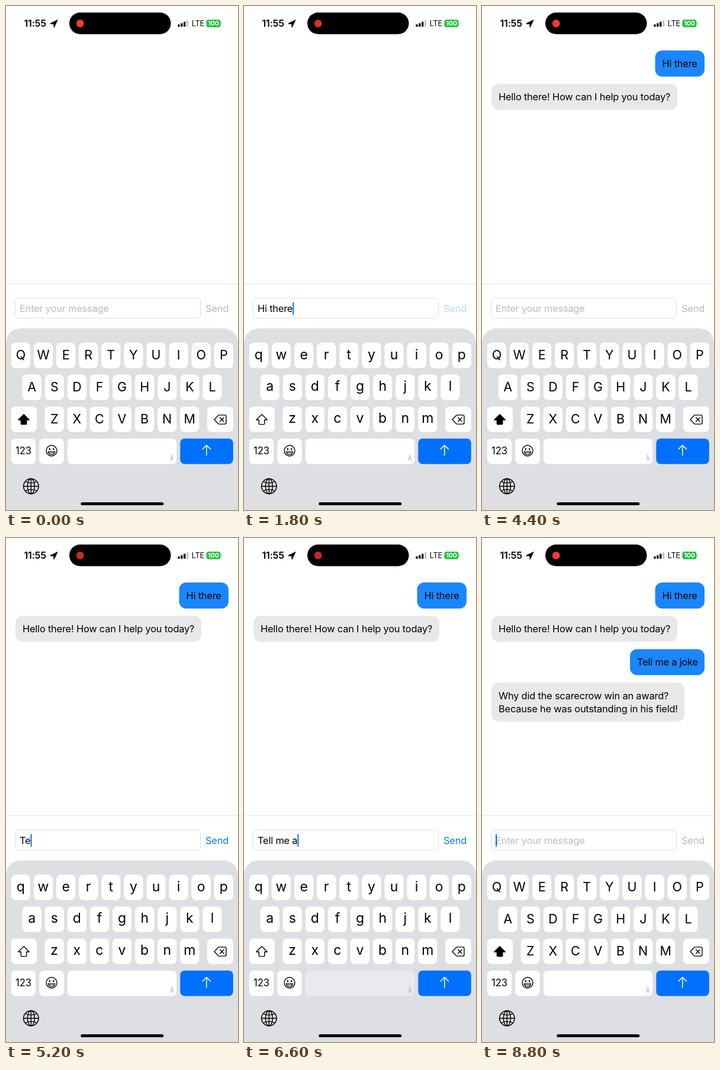
Write an HTML page that moves like this. It is 392 px wide and 850 px high and loops after 8900 ms.

```html
<!DOCTYPE html>
<html lang="en">
<head>
<meta charset="utf-8">
<title>Chat</title>
<style>
  html, body { margin: 0; width: 100%; height: 100%; overflow: hidden; background: #fff; }
  svg { display: block; width: 392px; height: 850px; }
  text { font: 400 16.4px Inter, Roboto, sans-serif; letter-spacing: -.2px; white-space: pre; }
  .key { letter-spacing: 0; text-anchor: middle; }
</style>
</head>
<body>
<svg id="stage" viewBox="0 0 392 850"></svg>
<script>
const LOOP = 8900;
const stage = document.getElementById('stage');

function add(tag, attrs, parent = stage) {
  const el = document.createElementNS('http://www.w3.org/2000/svg', tag);
  for (const name in attrs) el.setAttribute(name, attrs[name]);
  return parent.appendChild(el);
}
const box = (x, y, width, height, rx, fill, parent) =>
  add('rect', { x, y, width, height, rx, fill }, parent);
const line = (d, stroke, width, parent) =>
  add('path', { d, stroke, 'stroke-width': width, fill: 'none',
    'stroke-linecap': 'round', 'stroke-linejoin': 'round' }, parent);
function label(string, x, y, style = '', parent) {
  const el = add('text', { x, y, style }, parent);
  el.textContent = string;
  return el;
}
function show(el, visible) {
  el.style.visibility = visible ? 'visible' : 'hidden';
}

// Status bar
label('11:55', 30.5, 35, 'font-size:16px;font-weight:600');
add('path', { d: 'M87.3 23.3L75 29.3Q74.3 30 75.2 30.2L80.6 30.3L80.8 35.7Q81 36.6 81.6 35.7Z', stroke: '#000', 'stroke-width': .6 });
box(107, 11, 171.5, 36.5, 18.25, '#000');
const recordDot = add('circle', { cx: 125.2, cy: 29.5, r: 6.4, fill: '#ff3b30' });
[4, 6, 8.5, 11].forEach((h, i) =>
  box(290.3 + i * 4.9, 35 - h, 3.3, h, 1, i < 3 ? '#000' : '#c6c6c6'));
label('LTE', 313.8, 34.2, 'font-size:12.6px');
box(338.5, 23, 24, 12.8, 4, '#1fc13d');
box(363.4, 27.3, 1.4, 4.4, .7, '#8cdc99');
label('100', 350.5, 33.4, 'font-size:10.8px;font-weight:700;fill:#fff;text-anchor:middle');

// Conversation
function bubble(x, y, w, h, fill, lines) {
  const g = add('g', {});
  box(x, y, w, h, 12, fill, g);
  lines.forEach((s, i) => label(s, x + 12, y + 28 + i * 22, '', g));
  return g;
}
const BLUE = '#1a86ff', GRAY = '#e8e8ea';
const messages = [
  [1850, bubble(292.5, 75, 83.5, 44, BLUE, ['Hi there'])],
  [2250, bubble(16, 131.2, 314, 43.8, GRAY, ['Hello there! How can I help you today?'])],
  [8095, bubble(250, 187.4, 126, 43.8, BLUE, ['Tell me a joke'])],
  [8450, bubble(16, 243.7, 326.5, 65.8, GRAY,
    ['Why did the scarecrow win an award?', 'Because he was outstanding in his field!'])]
];

// Message field
box(0, 468, 392, 1, 0, '#e1e1e3');
add('rect', { x: 15.5, y: 492.7, width: 313, height: 34, rx: 5, fill: '#fff', stroke: '#dfdfe1' });
const placeholder = label('Enter your message', 23, 516, 'fill:#bcbcbf');
const typed = label('', 23, 516);
const caret = box(23, 499.3, 2, 21.5, 1, '#0a70e6');
const send = label('Send', 337, 516);

// Keyboard
add('path', { d: 'M0 850V571Q0 543.5 29 543.5H363Q392 543.5 392 571V850Z', fill: '#dedfe3' });
const letters = [];
[['QWERTYUIOP', 8.8, 567.8], ['ASDFGHJKL', 27.6, 621.6], ['ZXCVBNM', 65.6, 675.4]]
  .forEach(([row, left, y]) => [...row].forEach((char, i) => {
    const x = left + i * 38.1;
    box(x, y, 32.2, 43, 7.5, '#fff');
    const el = label(char, x + 16.1, 0);
    el.setAttribute('class', 'key');
    letters.push({ el, char, y });
  }));
box(8.8, 675.4, 43.2, 43, 7.5, '#fff');
box(340, 675.4, 43.8, 43, 7.5, '#fff');
box(8.8, 729.4, 41.4, 43, 7.5, '#fff');
box(56.2, 729.4, 41.6, 43, 7.5, '#fff');
const spaceKey = box(103.8, 729.4, 184.4, 43, 7.5, '#fff');
box(294.3, 729.4, 89.5, 43, 7.5, '#0070ff');

const shift = line('M30 688.8L39.2 698H34.7V704.5Q34.7 705.6 33.6 705.6H26.4Q25.3 705.6 25.3 704.5V698H20.8Z', '#000', 1.4);
line('M352 697.5L358.3 690.8Q359.2 689.9 360.4 689.9H369.5Q372 689.9 372 692.4V702.6Q372 705.1 369.5 705.1H360.4Q359.2 705.1 358.3 704.2ZM361.6 694.2L368 700.8M368 694.2L361.6 700.8', '#000', 1.4);
label('123', 29.5, 756.4, 'font-size:16.6px').setAttribute('class', 'key');

add('circle', { cx: 77, cy: 750, r: 9, fill: 'none', stroke: '#000', 'stroke-width': 1.4 });
add('ellipse', { cx: 73.8, cy: 747.2, rx: 1.2, ry: 1.8 });
add('ellipse', { cx: 80.2, cy: 747.2, rx: 1.2, ry: 1.8 });
line('M71.2 751.2H82.8Q82 756.5 77 756.5Q72 756.5 71.2 751.2ZM72.3 753.3H81.7', '#000', 1.1);
line('M278 766.8L280.3 757.2L282.6 766.8M278.8 763.6H281.8', '#b4b4b7', 1);
line('M338.8 758V740.8M332.2 747.4L338.8 740.8L345.4 747.4', '#fff', 1.5);

add('circle', { cx: 42.3, cy: 810, r: 12.7, fill: 'none', stroke: '#000', 'stroke-width': 1.5 });
add('ellipse', { cx: 42.3, cy: 810, rx: 6, ry: 12.7, fill: 'none', stroke: '#000', 'stroke-width': 1.4 });
line('M42.3 797.3V822.7M29.6 810H55M32.5 802.2Q42.3 807 52.1 802.2M32.5 817.8Q42.3 813 52.1 817.8', '#000', 1.4);
box(126.3, 836.9, 140, 5, 2.5, '#000');

// Each draft: its text, the time of every key press, and the time it is sent
const drafts = [
  { text: 'Hi there', keys: [300, 480, 680, 860, 1010, 1160, 1330, 1500], sent: 1850 },
  { text: 'Tell me a joke', sent: 8095,
    keys: [4900, 5100, 5290, 5450, 5630, 5830, 6000, 6190, 6450, 6640, 6870, 7070, 7240, 7400] }
];
const presses = drafts.flatMap(d => [...d.keys, d.sent]).sort((a, b) => a - b);
const spaces = drafts.flatMap(d => d.keys.filter((_, i) => d.text[i] === ' '));
const PRESS_LEAD = 120;

function draftAt(t) {
  const d = drafts.find(d => t >= d.keys[0] && t < d.sent);
  return d ? d.text.slice(0, d.keys.filter(k => k <= t).length) : '';
}

function caretOn(t) {
  const idle = t - (presses.filter(p => p <= t).pop() ?? -710);
  return idle < 710 || (idle - 710) % 850 >= 400;
}

function setCase(upper) {
  for (const { el, char, y } of letters) {
    el.textContent = upper ? char : char.toLowerCase();
    el.setAttribute('y', y + (upper ? 28.6 : 27.8));
    el.style.fontSize = upper ? '21.5px' : '23px';
  }
  shift.setAttribute('fill', upper ? '#000' : 'none');
}

let wasEmpty;
function draw(t) {
  const text = draftAt(t), empty = text === '';
  if (empty !== wasEmpty) setCase(wasEmpty = empty);

  typed.textContent = text;
  show(placeholder, empty);
  caret.setAttribute('x', 23 + (empty ? 0 : typed.getComputedTextLength()));
  show(caret, caretOn(t));

  const pressed = drafts.some(d => t >= d.sent - PRESS_LEAD && t < d.sent);
  send.style.fill = empty ? '#b9b9bc' : pressed ? '#b8dcf8' : '#0878e4';
  spaceKey.setAttribute('fill', spaces.some(s => t >= s - 50 && t < s + 50) ? '#e9eaed' : '#fff');

  for (const [at, el] of messages) show(el, t >= at);
  recordDot.setAttribute('opacity', .88 + .12 * Math.cos((t - 1350) / 1500 * 2 * Math.PI));
}

const start = performance.now();
function tick() {
  draw((performance.now() - start) % LOOP);
  requestAnimationFrame(tick);
}
tick();
</script>
</body>
</html>
```
